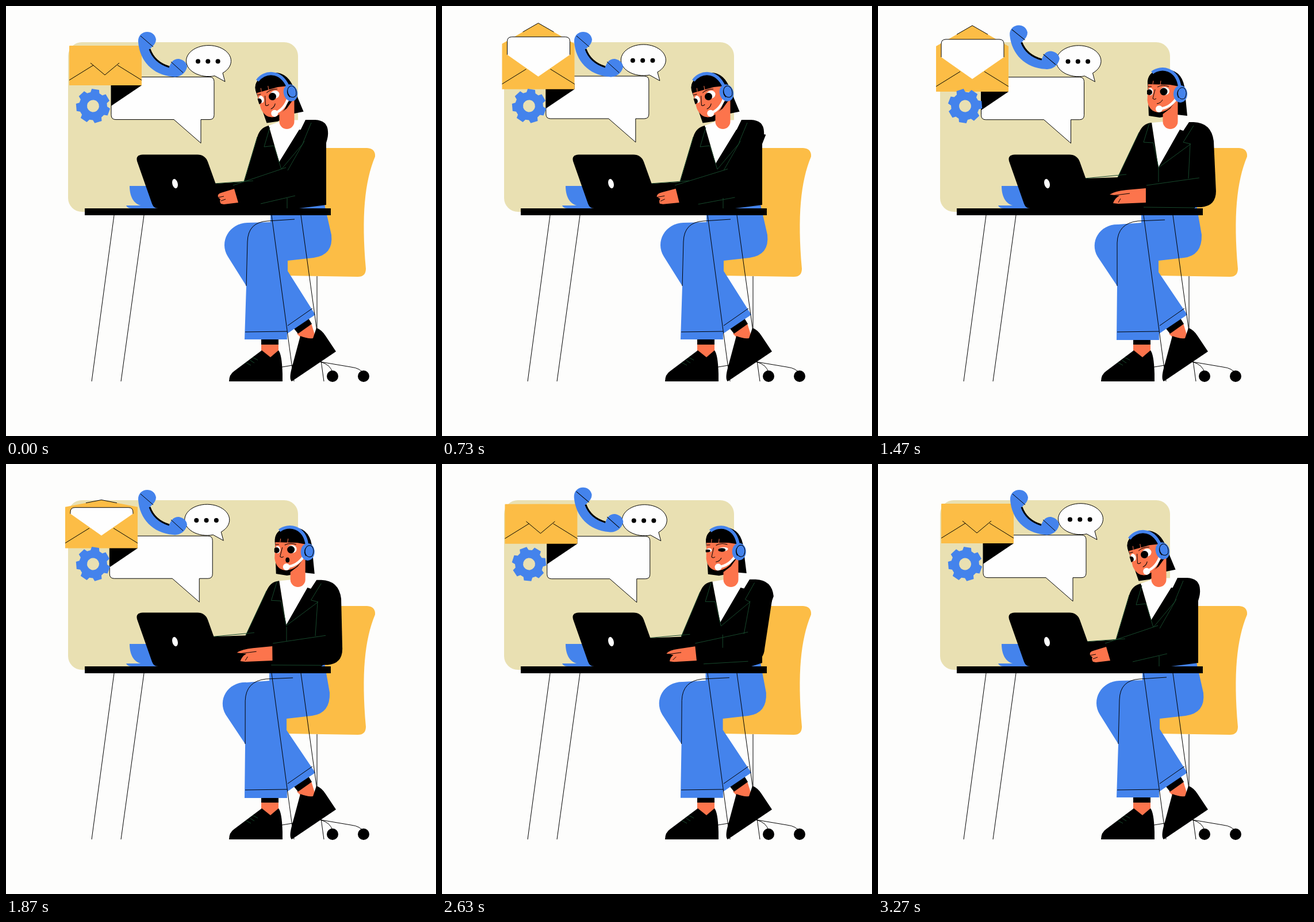
An HTML page with a canvas for the animation above (3.31 s loop, 748 px wide and 748 px high).

```html
<!DOCTYPE html>
<html lang="en">
<head>
<meta charset="utf-8">
<title>Support desk</title>
<style>
html, body { margin: 0; width: 100%; height: 100%; overflow: hidden; background: #fdfdfc; }
canvas { display: block; width: 100vw; height: 100vh; }
</style>
</head>
<body>
<canvas id="stage" width="748" height="748"></canvas>
<script>
const ctx = document.getElementById('stage').getContext('2d');
const LOOP = 3310;
const BLACK = '#000', WHITE = '#fefefe', BLUE = '#4483ec', YELLOW = '#fcbd46',
      SKIN = '#fc744c', SAND = '#e9e0b2', SEAM = '#17482c';

const clamp = v => Math.max(0, Math.min(1, v));
const lerp = (a, b, u) => a + (b - a) * u;
const smooth = u => u * u * (3 - 2 * u);

// Eased value from [time, value] keys
function track(t, keys) {
  for (let i = 1; i < keys.length; i++) {
    const [t0, a] = keys[i - 1], [t1, b] = keys[i];
    if (t <= t1) return lerp(a, b, smooth(clamp((t - t0) / (t1 - t0))));
  }
  return keys[keys.length - 1][1];
}

// Blend two paths that share the same commands
function mix(a, b, u) {
  const ends = b.match(/-?[\d.]+/g);
  let i = 0;
  return a.replace(/-?[\d.]+/g, v => lerp(+v, +ends[i++], u).toFixed(2));
}

function fill(d, color, outline) {
  const path = new Path2D(d);
  ctx.fillStyle = color;
  ctx.fill(path);
  if (outline) line(path);
}

function line(d, color = BLACK, width = 1) {
  ctx.strokeStyle = color;
  ctx.lineWidth = width;
  ctx.stroke(new Path2D(d));
}

function oval(x, y, rx, ry, color, turn = 0) {
  ctx.beginPath();
  ctx.ellipse(x, y, rx, ry, turn, 0, Math.PI * 2);
  ctx.fillStyle = color;
  ctx.fill();
}

function box(x, y, w, h, r, color) {
  ctx.beginPath();
  ctx.roundRect(x, y, w, h, r);
  ctx.fillStyle = color;
  ctx.fill();
}

function at(x, y, turn, draw) {
  ctx.save();
  ctx.translate(x, y);
  ctx.rotate(turn);
  draw();
  ctx.restore();
}

function bubbles(drift, bob) {
  const dx = -3.5 * drift;
  at(dx, bob, 0, () => {
    const body = 'M191 124H354Q362 124 362 132V190Q362 198 354 198H339V239L292 198H191Q183 198 183 190V132Q183 124 191 124Z';
    fill(body, WHITE);
    ctx.save();
    ctx.clip(new Path2D(body));
    // Shadow cast from the envelope's lower right corner
    const x = 236 - 9 * drift - dx, y = 138 + 11 * drift - bob;
    fill(`M${x} ${y}L${x - 80} ${y + 54}V${y - 10}H${x}Z`, BLACK);
    ctx.restore();
    line(body);
    fill('M363 122A39 27 0 1 1 377 117L381 132Z', WHITE, true);
    for (const x of [334, 351.3, 368.6]) oval(x, 96.8, 4, 4, BLACK);
  });
}

function envelope(drift, open) {
  const up = Math.max(0, open), top = lerp(69.5, 59, up);
  const apex = lerp(69, 23, up), paper = lerp(77, 47, up), r = Math.min(8, 78 - paper);
  at(-9 * drift, 11 * drift, 0, () => {
    fill(`M110 ${top}L173 ${apex}L236 ${top}V138H110Z`, YELLOW);
    if (open > 0) line(`M146 ${lerp(apex, top, .43)}L173 ${apex}L200 ${lerp(apex, top, .43)}`);
    const sheet = `M119 78V${paper + r}Q119 ${paper} ${119 + r} ${paper}H${228 - r}Q228 ${paper} 228 ${paper + r}V78`;
    if (open > -1) fill(sheet + 'L173 116Z', WHITE);
    if (open > 0) line(sheet);
    if (open <= 0) {
      const tip = lerp(69, 120, -open), edge = lerp(69, tip, .59);
      fill(`M110 69H236L172 ${tip}Z`, YELLOW);
      line(`M147 ${edge}L172 ${tip}L197 ${edge}`);
    }
    line('M110 129L152 103M236 129L194 103');
  });
}

function phone(hop) {
  at(272, 84 - hop, -hop * .003, () => {
    ctx.translate(-272, -84);
    fill('M230 62C229 41 258 39 261 58Q261 66 251 74Q259 98 284 106Q289 91 301 92Q314 95 315 106C312 119 300 125 290 123C255 120 232 95 230 62Z', BLUE);
    line('M250 75Q258 98 284 106', BLACK, 3);
    line('M234 52L256 71M287 97L308 116');
  });
}

function gear(turn) {
  at(151.5, 174, turn, () => {
    const teeth = 7, step = Math.PI * 2 / teeth;
    ctx.beginPath();
    for (let i = 0; i < teeth; i++) {
      for (const [part, r] of [[-.36, 24.5], [-.24, 30], [.24, 30], [.36, 24.5]]) {
        const a = (i + part) * step;
        ctx.lineTo(Math.sin(a) * r, -Math.cos(a) * r);
      }
    }
    ctx.closePath();
    ctx.moveTo(10.5, 0);
    ctx.arc(0, 0, 10.5, 0, Math.PI * 2, true);
    ctx.fillStyle = BLUE;
    ctx.fill('evenodd');
  });
}

function chair() {
  line('M541 470V618M480 628L541 618L600 628Q617 630 622 640M547 619Q565 624 568 638');
  oval(568, 644, 10, 10, BLACK);
  oval(622, 644, 10, 10, BLACK);
  fill('M535 247L628 247Q643 248 642 262C624 305 618 365 626 457Q626 471 612 471L488 469V430H535Z', YELLOW);
}

function legs(lean) {
  fill('M444 580H474V600L460 612L444 600Z', SKIN);
  fill('M506 570L531 552L539 578L516 580Z', SKIN);
  fill('M444 579H474V589H444ZM500 560L526 543L532 553L508 570Z', BLACK);
  fill('M388 653Q388 641 397 635L445 599L460 611L474 599Q480 606 481 640V653Z', BLACK);
  fill('M512 574Q524 579 534 578L540 560Q549 563 556 574L574 601L497 653Q492 649 497 630Z', BLACK);
  line('M417 620L426 625M423 615L432 621M429 611L438 616', SEAM);
  fill(mix(
    'M460 352L554 345L566 398Q570 433 535 438L490 443V461L538 537L489 570V580H415L418 487L386 436C370 410 388 378 420 377L460 376Z',
    'M458 352L554 346L563 398Q564 434 532 438L488 443V463L538 537L489 570V581H415L416 487L382 436C367 410 386 379 418 380L458 377Z', lean), BLUE);
  line(mix('M502 371L455 374Q421 376 420 410L418 487', 'M499 372L452 374Q417 378 416 412L416 487', lean));
  line('M416 567L489 566M490 556L533 526');
}

function torso(lean, reach) {
  fill(mix('M457 208L482 199L522 198L479 284Z', 'M476 203L500 201L541 203L488 282Z', lean), WHITE);
  fill(mix(
    'M457 208C446 211 441 216 437 228L414 306L362 309L377 352H510L557 346V238Q561 226 560 218Q559 199 538 198L521 198L479 284Z',
    'M476 203C464 204 459 210 454 220L417 298L359 300L375 352H550L557 346V322Q572 262 584 235Q580 203 549 202L541 202L488 282Z', lean), BLACK);
  // Near upper arm and elbow
  fill(mix(
    'M510 215L560 222L516 318Q512 335 500 335L450 340V312Z',
    'M525 215L584 235L588 322Q588 348 562 350L470 350V312Z', reach), BLACK);
  line(mix(
    'M459 211L449 245L466 243L479 284L516 240L519 232L531 203M519 235L490 286M489 334V352',
    'M472 204L462 237L479 238L488 281L544 240L531 237L549 208M543 240L540 300M488 281V306', lean), SEAM);
  line(mix('M437 228L414 305M362 309L430 304', 'M454 220L417 298M359 300L432 293', lean), SEAM);
}

function forearm(reach) {
  line(mix('M395 312L487 281M443 344L503 330', 'M467 312L559 299M462 350L550 351', reach), SEAM);
  fill(mix(
    'M397 318L374 325Q367 327 369 333L373 336Q371 340 374 344L379 345L404 342Z',
    'M466 317L432 320Q412 322 403 328L420 330Q412 334 409 343L418 344L466 342Z', reach), SKIN);
  line(mix('M369 333L379 331M374 339L382 336', 'M406 330L438 326M418 342Q422 335 436 334', reach).replace('Q', 'L'));
}

function eye(x, y, rx, ry, pupil, open, gaze) {
  if (open < .15) {
    line(`M${x - rx} ${y + 2}Q${x} ${y + 6} ${x + rx} ${y + 1}`, BLACK, 1.6);
    return;
  }
  oval(x + 1, y, rx, ry * open, WHITE);
  oval(x - 1 - 3 * gaze, y + 1 + gaze, pupil, pupil * open, BLACK);
}

// Head drawn upright, then tilted about the ear
function head(lean, open, talk) {
  const gaze = 1 - lean;
  const place = draw => at(lerp(495, 526, lean), lerp(151, 153, lean), -.297 * gaze * gaze, () => {
    ctx.translate(-526, -153);
    draw();
  });
  place(() => fill('M469 135Q469 113 494 110Q527 108 533 140L538 191L520 189L490 194L471 191Z', BLACK));

  const x = lerp(488.5, 508.5, lean);
  fill(`M${x - 13} 201V188L${x} 178L${x + 13} 160V201A13 13 0 0 1 ${x - 13} 201Z`, SKIN);

  place(() => {
    fill('M470 132L468.5 164Q471 184 488 185Q507 183 515 168L523 164V132Z', SKIN);
    ctx.save();
    ctx.clip(new Path2D('M468 125H523V190H468Z'));
    eye(473, 149, 4.5, 6.5, 5, open, gaze);
    ctx.restore();
    eye(498, 148, 8, 7, 6.5, open, gaze);
    line('M486 141Q495 136 506 140M470 140L476 140M482 145L478 161Q481 164 484 161');
    if (talk > .15) oval(491, 167, 3.5, 4.5 * talk, BLACK);
    else line('M485 170Q492 169 495 163');
    fill('M469 136Q467 114 494 110Q519 109 524 140L508 137Z', BLACK);
    line('M478 136L479 130M491 137L492 130', SKIN);
    line('M477 116C492 104 521 108 525 142', BLUE, 5.5);
    line('M519 161Q508 177 490 179', WHITE, 4.5);
    oval(489, 179, 6, 6, WHITE);
    oval(526, 153, 12, 15, BLUE);
    line('M533 143A8 10 0 1 0 534 160Q539 150 533 143M522 147Q519 154 523 160');
  });
}

function desk() {
  fill('M215 313H262V348H240C224 347 215 334 215 313Z', BLUE);
  fill('M209 347H262V352H219Q211 352 209 347Z', BLUE);
  fill('M238 258.5H332Q346 258 351 271L380 352H264Q257 352 254 344L228 270Q225 259 238 258.5Z', BLACK);
  oval(294, 309, 4.7, 8.3, WHITE, -.25);
  ctx.fillStyle = BLACK;
  ctx.fillRect(340, 320, 106, 32);
  ctx.fillRect(137, 352, 428, 12);
  line('M188 364L149 653M240 364L200 653M462 364L501 653M513 364L553 653');
}

const pulse = (t, start, span) => Math.sin(Math.PI * clamp((t - start) / span));
const blink = (t, mid) => clamp(1 - Math.abs(t - mid) / 120);

function render(t) {
  const lean = track(t, [[0, 0], [1120, 0], [1430, 1], [1560, 1], [1870, .96], [2410, .96], [3060, 0]]);
  const reach = track(t, [[0, 0], [730, .14], [1120, .19], [1430, 1], [1870, .96], [2380, .93], [3040, 0]]);
  const drift = track(t, [[0, 0], [1270, 1], [1450, 1], [2850, 0]]);
  const open = track(t, [[0, -1], [60, -1], [360, 1.06], [520, 1], [1600, 1], [1870, .33], [2130, -1]]);
  const bob = -2 * Math.sin(Math.PI * 2 * (t + 120) / LOOP);
  const hop = 12.5 * pulse(t, 1330, 280) + 6 * pulse(t, 1640, 200)
            + 14 * pulse(t, 2270, 300) + 8 * pulse(t, 2590, 210);
  const turn = .14 + Math.PI * 2 / 7 * (track(t, [[1240, 0], [1700, 1]]) + track(t, [[2400, 0], [2900, 1]]));
  const lids = 1 - clamp(1.1 * blink(t, 1130) + blink(t, 2690));
  const talk = t > 1610 && t < 2390 ? Math.cos(Math.PI * (t - 1870) / 260) ** 2 : 0;

  ctx.fillStyle = '#fdfdfc';
  ctx.fillRect(0, 0, 748, 748);
  box(108, 63, 400, 295, 24, SAND);
  bubbles(drift, bob);
  envelope(drift, open);
  gear(turn);
  phone(hop);
  chair();
  legs(lean);
  torso(lean, reach);
  head(lean, lids, talk);
  desk();
  forearm(reach);
}

const start = performance.now();
function tick() {
  render((performance.now() - start) % LOOP);
  requestAnimationFrame(tick);
}
tick();
</script>
</body>
</html>
```
